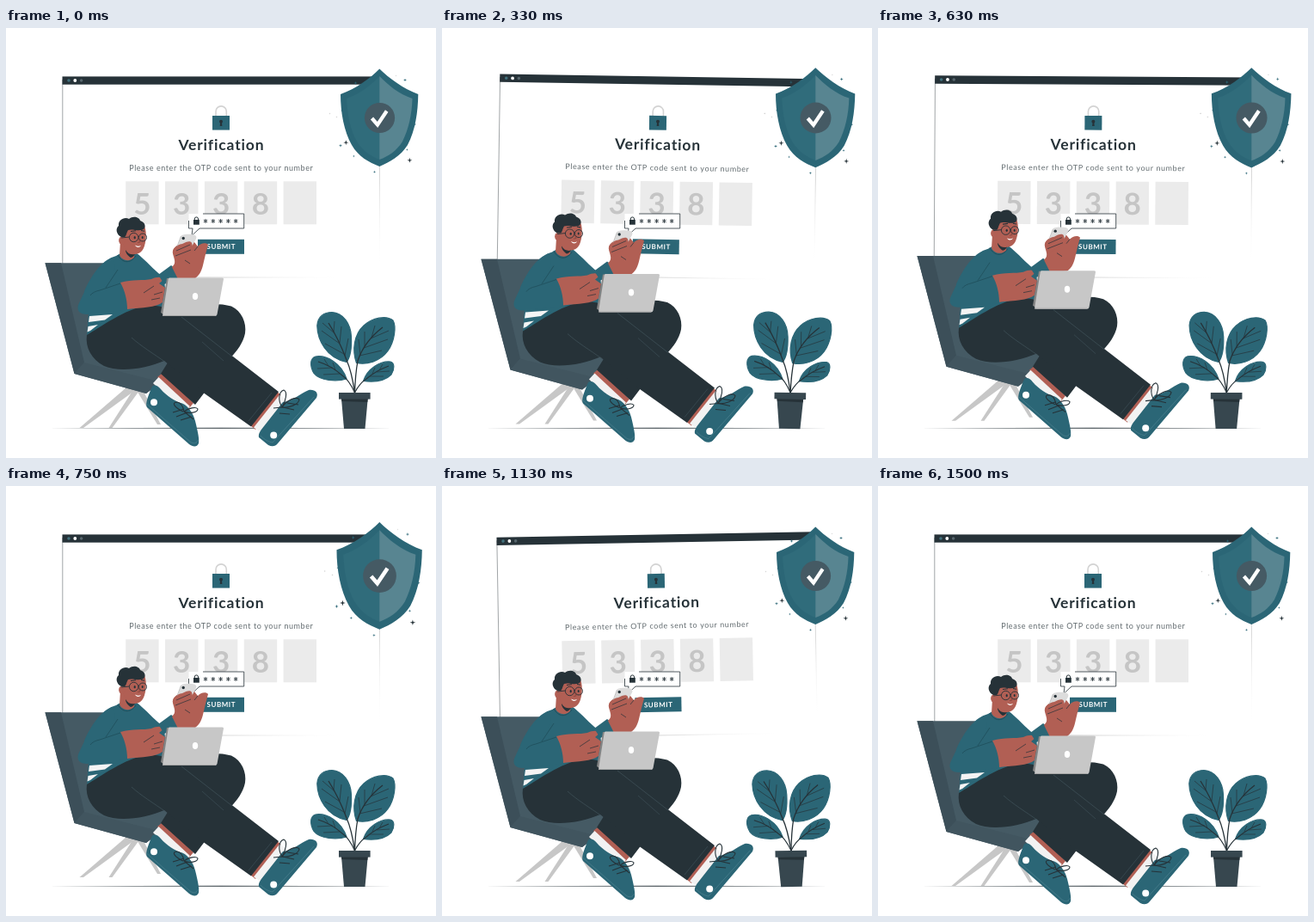
Animation, 500 px wide and 500 px high, one loop 1.54 s. Source, as an HTML page with a canvas:

```html
<!DOCTYPE html>
<html lang="en">
<head>
<meta charset="utf-8">
<title>Verification</title>
<style>
html, body { margin: 0; width: 100%; height: 100%; overflow: hidden; background: #fff; }
canvas { display: block; width: 100vw; height: 100vh; }
</style>
</head>
<body>
<canvas id="stage"></canvas>
<script>
const SIZE = 500, LOOP = 1540, STEP = LOOP / 37, CYCLE_STEPS = 36;
const TEAL = '#2b6676', DARK = '#263238', SLATE = '#455a64', DEEP = '#37474f';
const SKIN = '#b15f54', GREY = '#c7c7c7', PALE = '#ebebeb', WHITE = '#fff';
const FONT = 'Lato, "Open Sans", sans-serif';

const canvas = document.getElementById('stage');
const ctx = canvas.getContext('2d');

function fill(path, color) {
  ctx.fillStyle = color;
  ctx.fill(new Path2D(path));
}

function line(path, color = DARK, width = 1) {
  ctx.strokeStyle = color;
  ctx.lineWidth = width;
  ctx.stroke(new Path2D(path));
}

function rect(x, y, w, h, color) {
  ctx.fillStyle = color;
  ctx.fillRect(x, y, w, h);
}

function dot(x, y, r, color, ry = r) {
  ctx.fillStyle = color;
  ctx.beginPath();
  ctx.ellipse(x, y, r, ry, 0, 0, Math.PI * 2);
  ctx.fill();
}

function text(str, x, y, size, weight, color, spacing = 0) {
  ctx.font = `${weight} ${size}px ${FONT}`;
  ctx.letterSpacing = spacing + 'px';
  ctx.textAlign = 'center';
  ctx.fillStyle = color;
  ctx.fillText(str, x + spacing / 2, y);
}

function fade(x0, y0, x1, y1, color) {
  const g = ctx.createLinearGradient(x0, y0, x1, y1);
  g.addColorStop(0, color);
  g.addColorStop(0.5, color);
  g.addColorStop(1, 'rgba(255,255,255,0)');
  return g;
}

// Draws a part turned and scaled about its own centre
function around(x, y, degrees, scale, draw) {
  ctx.save();
  ctx.translate(x, y);
  ctx.rotate(degrees * Math.PI / 180);
  ctx.scale(scale, scale);
  ctx.translate(-x, -y);
  draw();
  ctx.restore();
}

// Linear float up and back down
const lift = p => -10 * (1 - Math.abs(2 * p - 1));

// Sway: +1 degree at a quarter, -1 degree at three quarters
const sway = p => p < 0.25 ? 4 * p : p < 0.75 ? 2 - 4 * p : 4 * p - 4;

// Two beats of 10 % per cycle
function beat(p) {
  const keys = [[0, 0], [0.1, 1], [0.3, 0], [0.4, 0], [0.5, 1], [0.6, 0], [1, 0]];
  const i = Math.max(1, keys.findIndex(k => p <= k[0]));
  const [t0, a] = keys[i - 1], [t1, b] = keys[i];
  const eased = 1 - Math.pow(1 - (p - t0) / (t1 - t0), 1.6);
  return 1 + 0.1 * (a + (b - a) * eased);
}

function drawWindow() {
  line('M65.8 60V290', '#8a8f92', 0.8);
  line('M65.8 290H400', fade(66, 0, 400, 0, '#aaa'), 0.6);
  line('M434.4 66V278', fade(0, 66, 0, 278, '#bbb'), 0.6);
  rect(65.5, 56.4, 369, 9.3, DARK);
  dot(73, 61, 1.8, '#41707c');
  dot(80.3, 61, 1.9, WHITE);
  dot(87.6, 61, 1.8, '#56656c');

  line('M244 103V97A6 6 0 0 1 256.3 97V103', '#d3d3d3', 1.6);
  rect(240, 102, 20, 16.6, TEAL);
  dot(250, 108.7, 2, DARK);
  fill('M249.3 109H250.8L251.4 114H248.7Z', DARK);

  text('Verification', 250, 141.7, 17.5, 'bold', DARK, 0.85);
  text('Please enter the OTP code sent to your number', 250, 165.6, 9, 'normal', '#636c70', 0.58);
  ['5', '3', '3', '8', ''].forEach((digit, i) => {
    const x = 139.2 + i * 45.85;
    rect(x, 178.3, 38.4, 50, PALE);
    text(digit, x + 19.2, 216.8, 35, 'bold', '#c5c5c5');
  });
  rect(223, 245.8, 54, 17, TEAL);
  text('SUBMIT', 250, 257.2, 8, 'bold', WHITE, 0.55);
}

function sparkle(x, y, r, color = DARK) {
  const s = r * 0.22;
  fill(`M${x} ${y - r}L${x + s} ${y - s}L${x + r} ${y}L${x + s} ${y + s}` +
    `L${x} ${y + r}L${x - s} ${y + s}L${x - r} ${y}L${x - s} ${y - s}Z`, color);
}

function drawShield() {
  fill('M434.3 47.6C424 58 407 71 389 77C389 98 393 120 402 136C410 150 422 156 434.3 161' +
    'C446 156 459 149 467 136C476 119 479 98 479.3 77C462 71 445 58 434.3 47.6Z', TEAL);
  fill('M434.3 56C425 66 411 77 396 82C397 101 400 118 408 132C415 143 424 149 434.3 153Z', '#306c7b');
  fill('M434.3 56C444 66 457 77 472.5 82C472 101 468 118 461 132C454 143 445 149 434.3 153Z', '#588591');
  dot(434.5, 104.5, 17.6, SLATE);
  line('M425.5 105L432 112.5L442.7 96.5', WHITE, 4.2);

  sparkle(395.3, 133.2, 3);
  sparkle(389, 136.8, 2, TEAL);
  sparkle(404.3, 149, 1.6, TEAL);
  sparkle(428.5, 167.3, 1.7, TEAL);
  sparkle(469.4, 153.8, 3);
  sparkle(466.3, 141.5, 1.6, TEAL);
  sparkle(475.6, 112, 1.7, TEAL);
  sparkle(464, 60.5, 2, TEAL);
  sparkle(453.5, 55.5, 1, GREY);
  sparkle(390.5, 96, 1.6, TEAL);
  sparkle(376.5, 99.5, 1.2, GREY);
  sparkle(384.5, 103.5, 1.2, GREY);
  sparkle(406.5, 64, 2, TEAL);
}

function leaf(path) {
  fill(path, TEAL);
  line(path, TEAL, 1.2);
}

function drawPlant() {
  ctx.lineJoin = 'round';
  leaf('M396 388.5C373 384 362 363 361.8 346C362.5 335 370 330.5 379 330.5C392 331 401 344 401.5 359C402 372 401 382 396 388.5Z');
  leaf('M407.5 389.5C402 374 405 356 416 346C426 337 442 333.5 450 340C454 347 452 364 444 375.5C435 388 419 392 407.5 389.5Z');
  leaf('M396 408C385 411.5 365 410.5 358 401.5C353 393 353.5 384 360 382C373 380 390 390 396 408Z');
  leaf('M415.5 410.5C420 396 435 387 447 388C452 389 452 397 448 403C440 411 427 412 415.5 410.5Z');

  line('M405.5 424C403 407 400 395 396 386C390 370 382 354 375 343', DARK, 1.3);
  line('M405.5 424C406 409 407 398 409 387C414 372 425 358 438 348', DARK, 1.3);
  line('M405.5 424C401 414 397 408 391 404C382 396 373 391 363 388', DARK, 1.1);
  line('M405.5 424C409 417 413 412 419 408C427 401 437 396 445 393', DARK, 1.1);
  line('M393 379L371 367M388 367L367 352M382 355L368 343M394 381L398 361M388 366L390 347M381 353L382 341', DARK, 0.7);
  line('M411 381L437 375M416 372L444 362M424 361L445 352M412 380L410 362M417 370L417 353M425 360L429 346', DARK, 0.7);
  line('M388 402L369 403M380 395L362 396M383 398L380 389M375 393L370 385M423 405L439 405M431 400L446 399M426 402L429 395M434 398L438 391', DARK, 0.65);

  fill('M390 431H420.7L417.5 466H393Z', DEEP);
  fill('M390 431H420.7L420.3 435L390.4 434Z', DARK);
  rect(387, 424, 36.6, 7.6, DEEP);
}

function drawBubble() {
  fill('M212.5 216H276.7V233H225L216 241.5L217 233H212.5Z', WHITE);
  line('M229 216H276.7V233H225L216 241.5L217 233H212.5V224', DARK, 0.8);
  rect(218, 223, 6.8, 5.7, DARK);
  line('M219.3 223.5V222A2.1 2.1 0 0 1 223.5 222V223.5', DARK, 1);
  for (let i = 0; i < 5; i++) {
    const x = 232 + i * 8.8;
    line(`M${x} 222V227M${x - 2.2} 223.2L${x + 2.2} 225.8M${x + 2.2} 223.2L${x - 2.2} 225.8`, DARK, 0.9);
  }
}

function drawChair() {
  fill('M140 418L152 420L90 465H85.5Z', GREY);
  fill('M149 419L157 419L123.5 465H119.5Z', GREY);
  fill('M151 420L158 419L180 461H176Z', GREY);
  fill('M45.5 273.3H128L190 384L188 404L180 413L163 425L79.5 402Z', SLATE);
  fill('M45.5 273.3H64L91 389L79.5 402Z', '#3c4f59');
  fill('M91 389L178 411L163 425L79.5 402Z', '#41555f');
}

function drawShoes() {
  fill('M182 401L218 436L213 442L176 406Z', SKIN);
  fill('M177.5 406L214 440L206 447L171 413Z', '#f2f2f2');
  fill('M170 416.5C173 414 177 416 180 420C187 428 196 434 205 436.5C213 440 219 450 221 461C223 470 225 478 224 483C222 488 217 487 213 484L164 441C161 437 167 424 170 416.5Z', TEAL);
  line('M163.5 437L214 481C218 484 222 483 223.5 479', '#4d8190', 0.7);
  dot(172, 435.2, 4, WHITE);
  line('M194 447L207 443M198 452L211 447M203 456L216 452', DARK, 1.1);
  line('M206 446C197 442 192 436 198 435C203 435 206 440 207 446C213 449 223 447 223 443C221 440 212 442 207 446L218 455', DARK, 1.1);

  fill('M314 422L320 427L290 467L284 462Z', SKIN);
  fill('M318.5 426L327 433L299 472L288 464.5Z', '#f2f2f2');
  fill('M300 463L322 435C333 434 342 425 352 421C359 420 364 424 361 430L316 483C313 487 309 487 305 485L294 476C293 471 297 467 300 463Z', TEAL);
  line('M296 474C301 479 305 481 310 482L358 429', '#4d8190', 0.7);
  dot(311.2, 473.5, 4, WHITE);
  line('M318 448L330 449M322 441L335 444M327 436L340 438', DARK, 1.1);
  line('M321 441C316 433 317 423 323 421C328 423 325 434 321 441C327 432 338 428 341 432C340 438 329 442 321 441L311 442', DARK, 1.1);
}

function drawTorso() {
  fill('M128 265C113 269 101 284 91 306L96 330L94 360L150 352L187 326L184 291C174 283 166 274 158 267C153 262 149 260 147 260L133 262Z', TEAL);
  fill('M97 335L124 333L115 339.5L96 342Z', '#f4f4f4');
  fill('M95.5 347L107 345L98 352L94.5 353.5Z', '#f4f4f4');
  fill('M133 248L150 255L149 267C144 272 135 271 132 264Z', SKIN);
  line('M130 264C135 273 144 275 151 265', '#204e5b', 1);
}

function drawTrousers() {
  fill('M188 329C211 322 243 318 262 323.5C274 329 280 343 278 355C276 366 268 376 262.5 382L220 438L180 402L200 370Z', DARK);
  fill('M94 357C108 349 139 326 164 323C180 321 193 328 204 336L264 382L317 423L285 463.5L228 423L184 387C163 396 132 401 114 393C99 385 92 371 94 357Z', DARK);
  line('M204 336L263 382', '#41535b', 0.7);
  line('M146 360C157 370 172 379 186 389', '#41535b', 0.7);
  line('M309 424L282 457M228 365L253 387', '#41535b', 0.6);
}

function drawHead() {
  fill('M136 232L161 230C164 238 163 249 160 256C157 263 149 265 142 261C137 257 134 247 136 232Z', SKIN);
  dot(134.7, 247, 3.6, SKIN, 4.6);
  fill('M139 258C142 263 146 264 150 263C148 266 146 267 145 267C142 265 139 262 139 258Z', DARK);
  fill('M134 243C128 240 127 233 131 230C130 223 138 219 143 222C148 218 155 220 156 224C162 226 163 231 160 234C154 237 147 233 142 235C140 238 140 242 138 243Z', DARK);
  ctx.strokeStyle = DARK;
  ctx.lineWidth = 0.9;
  for (const [x, r] of [[148.6, 5.2], [159, 4.5]]) {
    ctx.beginPath();
    ctx.arc(x, 243.5, r, 0, Math.PI * 2);
    ctx.stroke();
  }
  line('M134 244L143.4 243M153.8 242.5L154.5 242.5', DARK, 0.9);
  dot(149.7, 243.7, 1.1, DARK, 1.6);
  dot(158.7, 243.5, 1, DARK, 1.5);
  line('M145 236.5L151 235.7M157 235.5L161 236.3', DARK, 1.1);
  line('M154 244L156 249L153 249.5', '#7f3e38', 0.7);
  fill('M150 252.5C152 254 155 254 157 252.7C155.5 255.7 151.5 255.7 150 252.5Z', WHITE);
}

function drawArms() {
  fill('M123 267C106 275 93 302 84 322C82 329 86 333 94 333L140 328C143 318 140 305 134 296L113 301C124 288 132 278 123 267Z', TEAL);
  line('M133 297L109 305C104 306 100 308 98 311M116 302L130 281', '#204e5b', 0.8);
  fill('M133 296C147 292 160 294 169 292C175 289 182 289 184 292L178 297L185 302L182 319C174 325 159 325 141 327C141 316 138 305 133 296Z', SKIN);
  line('M182 307L172 310M179 314L169 316M160 308L172 300', DARK, 0.7);

  fill('M177 287L192 276C197 279 201 285 202 291L184 298Z', TEAL);
  fill('M193 278C199 273 195 268 194 262C193 257 198 252 207 250C214 246 217 246 219 249L223 254C226 250 233 249 235 252C233 259 231 267 229 276C227 284 224 288 220 291L200 292Z', SKIN);
  fill('M204 241C208 239.5 215 239.5 219 240.5C222 242 222 244 220 247L215 256L199 256Z', '#dcdcdc');
  fill('M194 262C193 257 198 252 205 251C210 248 215 247 216 250L218 258L199 270Z', SKIN);
  line('M203.5 242L199 254', '#aaa', 0.7);
  dot(206.2, 244.5, 1.7, DARK);
  line('M214 252L198 259M215 258L197 265M223 254L219 259M208 270L214 274', DARK, 0.7);
}

function drawLaptop() {
  fill('M187 291H193L186 335L180 331Z', '#858585');
  fill('M190 290.5H251.5Q253.3 290.5 253 292L245.5 333Q245 335 243 335H184Q181.8 335 182.2 333L188.7 292Q189 290.5 190 290.5Z', GREY);
  line('M182 334.5H243', '#a6a6a6', 1);
  dot(220, 312, 3.2, WHITE, 4);
}

function drawMan() {
  drawChair();
  drawShoes();
  drawTorso();
  drawTrousers();
  drawHead();
  drawArms();
  drawLaptop();
}

function render(now) {
  const ratio = window.devicePixelRatio || 1;
  const w = Math.round(innerWidth * ratio), h = Math.round(innerHeight * ratio);
  if (canvas.width !== w || canvas.height !== h) {
    canvas.width = w;
    canvas.height = h;
  }
  ctx.setTransform(w / SIZE, 0, 0, h / SIZE, 0, 0);
  ctx.lineJoin = 'miter';
  rect(0, 0, SIZE, SIZE, WHITE);

  const step = Math.floor((now % LOOP + 4) / STEP);
  const p = (step % 37) / CYCLE_STEPS;

  fill('M50 465.2L250 464.7L449 465.2L250 465.8Z', DARK);
  around(250, 173, sway(p), 1, drawWindow);
  around(434.3, 104.3, 0, beat(p), drawShield);
  around(403, 398, sway(p), 1, drawPlant);
  drawBubble();
  ctx.save();
  ctx.translate(0, lift(p));
  drawMan();
  ctx.restore();
}

const start = performance.now();
function loop() {
  render(performance.now() - start);
  requestAnimationFrame(loop);
}
loop();
</script>
</body>
</html>
```
